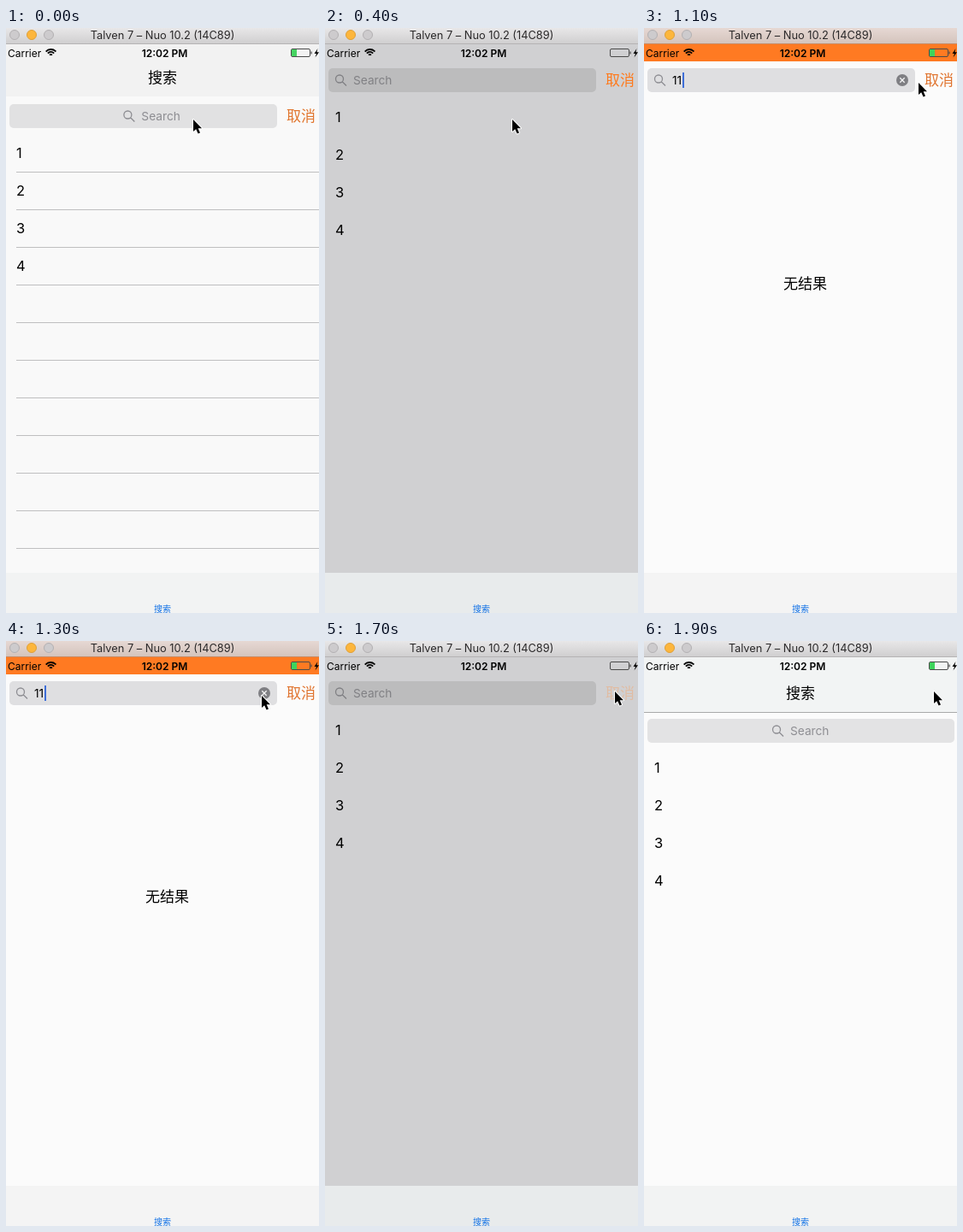
An HTML page with a canvas that plays this animation: 366x684 px, repeating every 2000 ms.

```html
<!DOCTYPE html>
<html lang="en">
<head>
<meta charset="utf-8">
<title>Search bar demo</title>
<style>
  html, body { margin: 0; width: 100%; height: 100%; overflow: hidden; }
  canvas { display: block; }
</style>
</head>
<body>
<canvas id="stage" width="366" height="684"></canvas>
<script>
const ctx = document.getElementById('stage').getContext('2d');
const W = 366, LOOP = 2000, STEP = 100;
const LATIN = 'Inter, sans-serif';
const HAN = '"Noto Sans CJK SC", "Noto Sans CJK", sans-serif';

// Pointer tip: [time, x, y]
const POINTER = [
  [0, 219, 107], [700, 219, 107], [1000, 321, 64], [1100, 321, 64],
  [1300, 299, 64], [1400, 299, 64], [1600, 339, 59], [2000, 339, 59]
];

const lerp = (a, b, p) => a + (b - a) * p;
const clamp = x => Math.min(1, Math.max(0, x));
const smooth = x => (x = clamp(x), x * x * (3 - 2 * x));
const mix = (a, b, p) => `rgb(${a.map((v, i) => Math.round(lerp(v, b[i], p)))})`;

function rect(x, y, w, h, color) {
  ctx.fillStyle = color;
  ctx.fillRect(x, y, w, h);
}

function text(str, x, y, font, color, align = 'left') {
  ctx.font = font;
  ctx.fillStyle = color;
  ctx.textAlign = align;
  ctx.fillText(str, x, y);
}

function line(color, width) {
  ctx.strokeStyle = color;
  ctx.lineWidth = width;
  ctx.stroke();
}

function disc(x, y, r, fill, stroke) {
  ctx.beginPath();
  ctx.arc(x, y, r, 0, 7);
  ctx.fillStyle = fill;
  ctx.fill();
  if (stroke) line(stroke, 1);
}

function polygon(points) {
  ctx.beginPath();
  points.forEach(([x, y]) => ctx.lineTo(x, y));
  ctx.closePath();
}

function withAlpha(alpha, draw) {
  ctx.save();
  ctx.globalAlpha = alpha;
  draw();
  ctx.restore();
}

function pointerAt(t) {
  const i = POINTER.findIndex(k => k[0] > t);
  const [t0, x0, y0] = POINTER[i - 1], [t1, x1, y1] = POINTER[i];
  const p = smooth((t - t0) / (t1 - t0));
  return [lerp(x0, x1, p), lerp(y0, y1, p)];
}

// focus: 0 = resting list, 1 = search bar docked at the top
function stateAt(t) {
  const leaving = t >= 1800;
  return {
    leaving,
    focus: leaving ? 1 - smooth((t - 1680) / 200) : smooth((t + 25) / 200),
    query: t < 500 || t >= 1400 ? '' : t < 600 ? '1' : '11',
    caret: t >= 500 && t < 1600,
    caretColor: t < 600 ? '#1b2230' : '#3f6fd8',
    cancelColor: t >= 1700 ? '#e0bca3' : null
  };
}

function drawWindowBar(s) {
  const bar = ctx.createLinearGradient(0, 0, 0, 18);
  bar.addColorStop(0, s.query ? '#e6d8d3' : '#e8e7e8');
  bar.addColorStop(1, s.query ? '#d4c4bd' : '#d0cfd0');
  rect(0, 0, W, 18, bar);
  rect(0, 18, W, 1, s.query ? '#c98a62' : '#b5b3b4');
  for (const x of [10, 50]) disc(x, 8, 5.5, '#cdcbcd', '#b3b0b2');
  disc(30, 8, 5.5, '#fdb63c', '#dfa038');
  text('Talven 7 – Nuo 10.2 (14C89)', 183, 13, `12.8px ${LATIN}`, '#2a2829', 'center');
}

function drawStatus(s) {
  text('Carrier', 2, 34, `12px ${LATIN}`, '#000');
  text('12:02 PM', 185.5, 34, `600 12px ${LATIN}`, '#000', 'center');

  for (const r of [2, 5, 8]) {
    ctx.beginPath();
    ctx.arc(52.5, 33, r, -Math.PI * 0.76, -Math.PI * 0.24);
    line('#000', 1.8);
  }
  ctx.beginPath();
  ctx.roundRect(333.5, 24.5, 22, 9, 1.5);
  line('#4a4a4a', 1);
  withAlpha(s.query ? 1 : 1 - s.focus, () => rect(334, 25, 6, 8, '#3fd45c'));
  rect(356.5, 27.5, 1.2, 3, '#4a4a4a');
  polygon([[364.5, 24], [360.5, 30], [363, 30], [361.5, 34.5], [366, 28.2], [363.4, 28.2]]);
  ctx.fillStyle = '#000';
  ctx.fill();
}

function drawSearch(s, y) {
  const dim = s.query ? 0 : s.focus;
  const width = s.leaving ? lerp(359, 313, s.focus) : 313;
  const iconX = lerp(s.leaving ? 150 : 143, 12, s.focus);
  const hint = mix([142, 142, 147], [128, 128, 132], dim);

  ctx.beginPath();
  ctx.roundRect(4, y, width, 28, 5);
  ctx.fillStyle = s.query ? '#dfdfe1' : mix([227, 227, 228], [188, 188, 189], dim);
  ctx.fill();

  ctx.beginPath();
  ctx.arc(iconX + 5, y + 12.5, 4.5, 0, 7);
  ctx.moveTo(iconX + 8.2, y + 15.7);
  ctx.lineTo(iconX + 13, y + 20.5);
  line(hint, 1.3);

  text(s.query || 'Search', iconX + 21, y + 19, `13.7px ${LATIN}`, s.query ? '#000' : hint);
  if (s.caret) rect(32 + 6.5 * s.query.length, y + 5, 2, 18, s.caretColor);

  if (s.query) {
    disc(302, y + 14, 7, '#7f7f83');
    ctx.beginPath();
    for (const d of [-2.7, 2.7]) {
      ctx.moveTo(302 - 2.7, y + 14 - d);
      ctx.lineTo(302 + 2.7, y + 14 + d);
    }
    line('#f4f4f4', 1.3);
  }

  const orange = s.query ? '#e0742f' : mix([224, 117, 46], [255, 122, 28], dim);
  withAlpha(s.leaving ? s.focus : 1, () =>
    text('取消', 345, y + 19.5, `17px ${HAN}`, s.cancelColor || orange, 'center'));
}

function drawList(s, lift) {
  for (let i = 0; i < 4; i++)
    text(String(i + 1), 12, 154 + 44 * i - lift, `16.5px ${LATIN}`, '#000');
  if (s.leaving) return;
  withAlpha(1 - s.focus, () => {
    for (let i = 0; i < 12; i++) {
      const y = Math.round(170 + 44 * i - lift);
      if (y < 637) rect(12, y, W - 12, 1, '#bdbdbe');
    }
  });
}

function drawNavigation(s) {
  const lift = Math.round(80 * s.focus);
  if (lift > 64) return;
  rect(0, 19, W, 64 - lift, s.leaving ? '#f2f4f4' : '#f2f2f2');
  if (s.leaving) rect(0, 83 - lift, W, 1, '#a9aaaa');
  text('搜索', 183, 67 - lift, `500 17px ${HAN}`, '#000', 'center');
}

function drawPointer([x, y]) {
  ctx.save();
  ctx.translate(x, y);
  polygon([[0, 0], [0, 14], [3.2, 11.2], [5.6, 16.5], [8, 15.4], [5.7, 10.3], [10, 10.3]]);
  ctx.lineJoin = 'round';
  line('#fff', 2);
  ctx.fillStyle = '#000';
  ctx.fill();
  ctx.restore();
}

function draw(t) {
  const s = stateAt(t);
  const lift = 44 * s.focus;
  const dim = s.query ? 0 : s.focus;
  rect(0, 0, W, 684, mix([251, 251, 251], [208, 208, 210], dim));

  if (s.query) {
    rect(0, 18, W, 21, '#ff7a22');
    text('无结果', 188.5, 304.5, `17px ${HAN}`, '#000', 'center');
  } else {
    drawList(s, lift);
    drawNavigation(s);
  }
  drawSearch(s, Math.round(91 - lift));

  rect(0, 637, W, 47, s.query ? '#f4f4f4' : mix([242, 243, 243], [232, 235, 236], dim));
  text('搜索', 183, 682.5, `10px ${HAN}`, '#0f70e6', 'center');
  drawWindowBar(s);
  drawStatus(s);
  drawPointer(pointerAt(t));
}

const start = performance.now();
function tick() {
  const t = (performance.now() - start) % LOOP;
  draw(Math.floor(t / STEP) * STEP);
  requestAnimationFrame(tick);
}
tick();
</script>
</body>
</html>
```
